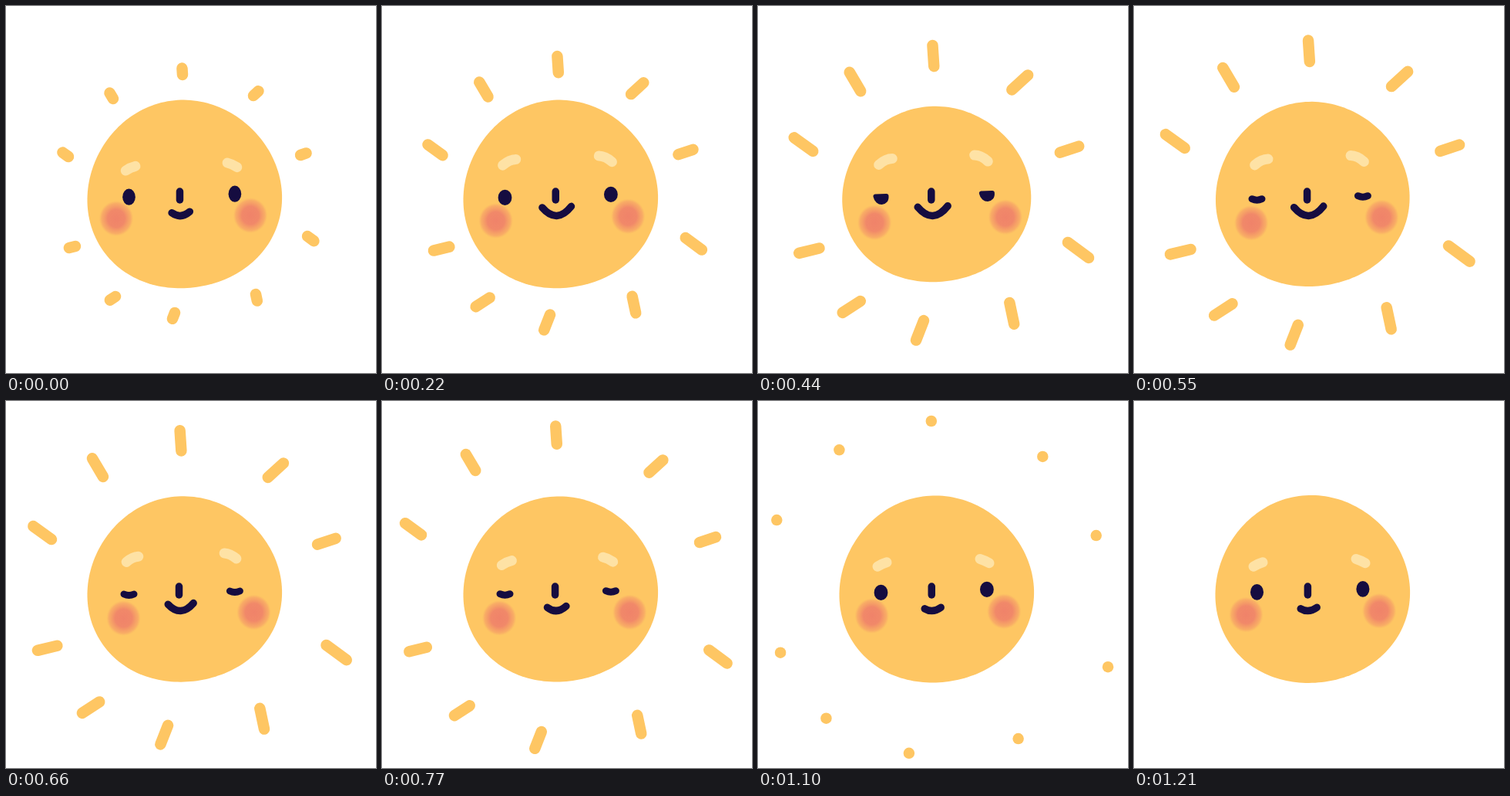
These frames come from a looping animation (480 px wide and 475 px high, 1320 ms). An HTML page with a canvas:

```html
<!DOCTYPE html>
<html lang="en">
<head>
<meta charset="utf-8">
<title>Sunny face</title>
<style>
  html, body { margin: 0; width: 100%; height: 100%; overflow: hidden; background: #fff; }
  canvas { display: block; width: 100vw; height: 100vh; }
</style>
</head>
<body>
<canvas id="stage" width="480" height="475"></canvas>
<script>
const ctx = document.getElementById('stage').getContext('2d');
const STEP = 110, STEPS = 12, LAST = STEPS - 1;
const GOLD = '#fec663', CREAM = '#fee2a5', INK = '#150c40';
const { PI, min, max, abs, sin, cos, exp } = Math;

// path of each ray: root x, y, tip x, y
const RAYS = [
  [229, 89, 225, 29], [321, 116, 367, 74], [382, 193, 436, 175], [391, 298, 451, 342], [324, 373, 337, 434],
  [219, 397, 197, 453], [142, 376, 91, 409], [90, 311, 32, 325], [81, 195, 27, 156], [139, 120, 107, 66]
];

// 1 near the peak, falling to 0 about a width away; a higher power gives a flatter top
const bump = (s, peak, width, power = 2) => exp(-((abs(s - peak) / width) ** power));
const lerp = (a, b, t) => a + (b - a) * t;

function bar(x0, y0, x1, y1, color, width, bend = 0) {
  ctx.strokeStyle = color;
  ctx.lineWidth = width;
  ctx.beginPath();
  ctx.moveTo(x0, y0);
  ctx.quadraticCurveTo((x0 + x1) / 2, (y0 + y1) / 2 + bend, x1, y1);
  ctx.stroke();
}

// the tail catches up with the head while both run outwards
function drawRays(s) {
  const tail = min(1.05, (s / 9.4) ** 2);
  const head = max(tail, min(1, 0.14 + 0.135 * s - 0.0029 * s * s));
  for (const [x0, y0, x1, y1] of RAYS) {
    const at = t => [lerp(x0, x1, t), lerp(y0, y1, t)];
    bar(...at(tail), ...at(head), GOLD, 14.5);
  }
}

// a circle with a slight two- and three-fold wobble
function drawBody(s) {
  const dip = bump(s, 4, 0.7);
  const breath = 0.008 * cos(2 * PI * (s - 1) / STEPS);
  const sx = 1 - 0.03 * dip, sy = 1 + breath - 0.06 * dip;
  ctx.fillStyle = GOLD;
  ctx.beginPath();
  for (let a = 0; a < 2 * PI; a += PI / 90) {
    const r = 123.6 + 2.7 * cos(2 * a + 0.25) + 1.8 * cos(3 * a - 1.09);
    ctx.lineTo(231 + sx * r * cos(a), 245 + sy * r * sin(a));
  }
  ctx.fill();
}

function drawCheek(x, y) {
  ctx.save();
  ctx.translate(x, y);
  ctx.scale(22.3, 23);
  const g = ctx.createRadialGradient(0, 0, 0, 0, 0, 1);
  g.addColorStop(0, 'rgba(239,128,106,.96)');
  g.addColorStop(0.5, 'rgba(239,128,106,.88)');
  g.addColorStop(0.85, 'rgba(241,138,104,.42)');
  g.addColorStop(1, 'rgba(245,160,100,0)');
  ctx.fillStyle = g;
  ctx.beginPath();
  ctx.arc(0, 0, 1, 0, 2 * PI);
  ctx.fill();
  ctx.restore();
}

function drawEye(x, y, lid) {
  ctx.save();
  ctx.translate(x, y + 3.5 * lid);
  ctx.fillStyle = ctx.strokeStyle = INK;
  ctx.beginPath();
  if (lid > 0.85) {
    bar(-6.5, -0.5, 6.5, -0.5, INK, 9, 3);
  } else if (lid > 0.6) {
    ctx.lineWidth = 6;
    ctx.moveTo(-7, -3);
    ctx.lineTo(7, -3.5);
    ctx.bezierCurveTo(8, 7, -5, 7, -7, -3);
    ctx.closePath();
    ctx.fill();
    ctx.stroke();
  } else {
    ctx.ellipse(0, 0, 8.2 + 2.8 * lid, 10.7 - 2.5 * lid, 0, 0, 2 * PI);
    ctx.fill();
  }
  ctx.restore();
}

function drawFace(s) {
  const smile = bump(s, 3.6, 3, 4);
  const lid = bump(s, 6, 3.4);
  const sway = sin(PI * s / STEPS);

  drawCheek(143 + 9.5 * sway, 275 + 6 * sway);
  drawCheek(317 + 4.5 * sway, 271 + 2.5 * sway);

  for (const side of [-1, 1]) {
    const x = 227.5 + side * (66.5 - 4.5 * smile);
    const y = 209.3 - side * 2.2 - 10 * smile;
    const w = 6 + 2.8 * smile, h = side * (2.7 + 1.3 * smile);
    bar(x - w, y - h, x + w, y + h, CREAM, 13, -1 - 3 * smile);
    drawEye(228.2 + side * 68.7, 245 - side * 2, lid);
  }

  bar(225.5 - lid, 240, 225.5 - lid, 251, INK, 9.5);
  const w = 10.5 + 9 * smile, y = 268 - 8.5 * smile;
  bar(226.7 - w, y + 0.8, 226.7 + w, y - 0.8, INK, 9.5, 7 + 17 * smile);
}

function draw(s) {
  ctx.fillStyle = '#fff';
  ctx.fillRect(0, 0, 480, 475);
  ctx.lineCap = ctx.lineJoin = 'round';
  if (s < LAST) drawRays(s);
  drawBody(s);
  drawFace(s);
}

let start = null;
function tick(now) {
  if (start === null) start = now;
  draw(Math.floor((now - start) / STEP) % STEPS);
  requestAnimationFrame(tick);
}
draw(0);
requestAnimationFrame(tick);
</script>
</body>
</html>
```
